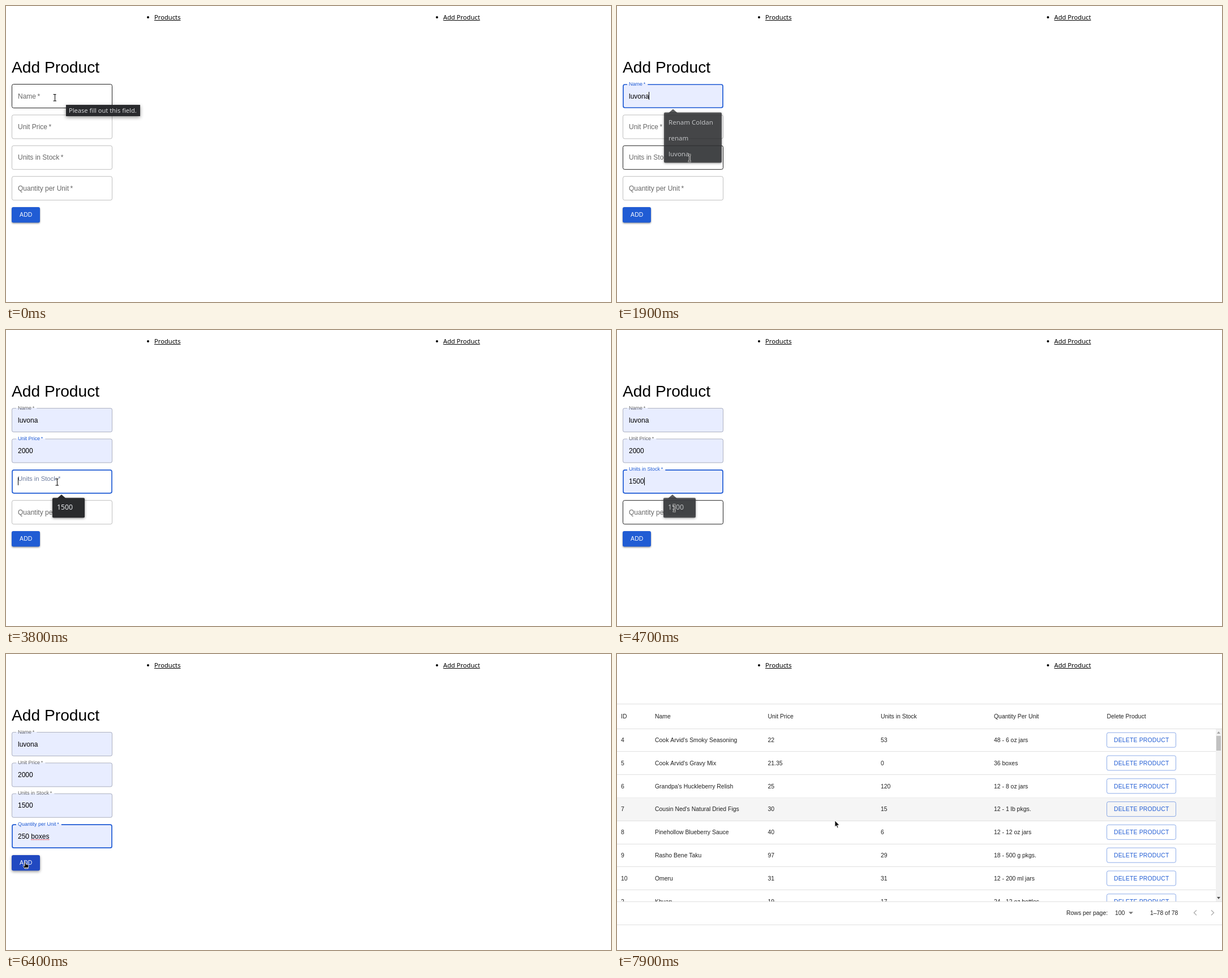
Recreate the animation shown at these times as an HTML page with a canvas. Size 1069x524 px, loop 8000 ms.

```html
<!DOCTYPE html>
<html lang="en">
<head>
<meta charset="utf-8">
<title>Add Product</title>
<style>
html, body { margin: 0; width: 100%; height: 100%; overflow: hidden; background: #fff; }
canvas { display: block; }
</style>
</head>
<body>
<canvas id="stage" width="1069" height="524"></canvas>
<script>
const ctx = document.getElementById('stage').getContext('2d');
const W = 1069, H = 524, LOOP = 8000, STEP = 100;
const SANS = '"Liberation Sans", Arial, sans-serif';
const NOTO = '"Noto Sans", "Open Sans", sans-serif';
const BLUE = '#205cd4', INK = 'rgba(0,0,0,.87)', GREY = 'rgba(0,0,0,.6)', LINE = '#e0e0e0';

// floatAt: label rises; focus..blur: focused; fillAt: suggestion previewed; pick: suggestion accepted
const fields = [
  { label: 'Name', value: 'luvona', items: ['Renam Coldan', 'renam', 'luvona'], popW: 102,
    floatAt: 250, focus: 300, blur: 2700, open: 400, fillAt: 1400, pick: 1900 },
  { label: 'Unit Price', value: '2000', items: ['2000'], popW: 57,
    floatAt: 2500, focus: 2700, blur: 3800, open: 2700, fillAt: 3100, pick: 3400 },
  { label: 'Units in Stock', value: '1500', items: ['1500'], popW: 57,
    floatAt: 3750, focus: 3800, blur: 5200, open: 3800, fillAt: 4200, pick: 4700 },
  { label: 'Quantity per Unit', value: '250 boxes', items: ['250 boxes'], popW: 85,
    floatAt: 5150, focus: 5200, blur: 6600, open: 5300, fillAt: 5800, pick: 5900 }
];
fields.forEach((f, i) => { f.y = 138.5 + 54.4 * i; });

const rows = [
  [4, "Cook Arvid's Smoky Seasoning", '22', '53', '48 - 6 oz jars'],
  [5, "Cook Arvid's Gravy Mix", '21.35', '0', '36 boxes'],
  [6, "Grandpa's Huckleberry Relish", '25', '120', '12 - 8 oz jars'],
  [7, "Cousin Ned's Natural Dried Figs", '30', '15', '12 - 1 lb pkgs.'],
  [8, 'Pinehollow Blueberry Sauce', '40', '6', '12 - 12 oz jars'],
  [9, 'Rasho Bene Taku', '97', '29', '18 - 500 g pkgs.'],
  [10, 'Omeru', '31', '31', '12 - 200 ml jars'],
  [2, 'Khuan', '19', '17', '24 - 12 oz bottles']
];
const heads = ['ID', 'Name', 'Unit Price', 'Units in Stock', 'Quantity Per Unit', 'Delete Product'];
const cols = [7, 67, 266.5, 466, 666, 865.5];

// time, x, y
const path = [
  [0, 86, 162], [100, 78, 162], [1100, 78, 162], [1200, 86, 190], [1300, 106, 245], [1400, 118, 272],
  [1600, 128, 268], [1900, 128, 269], [2000, 148, 262], [2400, 196, 226], [2600, 196, 226],
  [2700, 60, 223], [2900, 60, 223], [3100, 100, 256], [3400, 104, 260], [3800, 90, 269],
  [3900, 90, 270], [4200, 100, 312], [4700, 101, 315], [5200, 97, 335], [5600, 97, 335],
  [5800, 104, 366], [5900, 104, 368], [6400, 35, 368], [6500, 35, 369], [6600, 295, 383],
  [6700, 295, 383], [6800, 350, 296], [7400, 350, 296], [7600, 365, 299], [7700, 365, 299], [7900, 385, 295]
];

const clamp = v => Math.max(0, Math.min(1, v));
const mix = (a, b, p) => a + (b - a) * p;

function pointer(t) {
  let i = path.length - 1;
  while (path[i][0] > t) i--;
  const a = path[i], b = path[i + 1] || a;
  const p = b === a ? 0 : (t - a[0]) / (b[0] - a[0]);
  return { x: mix(a[1], b[1], p), y: mix(a[2], b[2], p) };
}

function text(s, x, y, size, color = INK, family = SANS, spacing = 0) {
  ctx.font = `${size}px ${family}`;
  ctx.letterSpacing = spacing + 'px';
  ctx.fillStyle = color;
  ctx.fillText(s, x, y);
  return ctx.measureText(s).width;
}

function rect(x, y, w, h, color) {
  ctx.fillStyle = color;
  ctx.fillRect(x, y, w, h);
}

function round(x, y, w, h, r) {
  ctx.beginPath();
  ctx.roundRect(x, y, w, h, r);
}

function poly(points, fill, stroke, width = 1) {
  ctx.beginPath();
  points.forEach(([x, y]) => ctx.lineTo(x, y));
  if (fill) { ctx.closePath(); ctx.fillStyle = fill; ctx.fill(); }
  if (stroke) { ctx.strokeStyle = stroke; ctx.lineWidth = width; ctx.stroke(); }
}

function shadow(alpha, blur, dy) {
  ctx.shadowColor = `rgba(0,0,0,${alpha})`;
  ctx.shadowBlur = blur;
  ctx.shadowOffsetY = dy;
}

function link(s, x) {
  ctx.beginPath();
  ctx.arc(x - 11, 20, 2, 0, 7);
  ctx.fillStyle = '#000';
  ctx.fill();
  const w = text(s, x, 24, 11.2, '#000', NOTO);
  rect(x, 25, w, 1, '#000');
}

function drawField(f, t, hover) {
  const up = clamp((t - f.floatAt) / 200);
  const focused = t >= f.focus && t < f.blur;
  const filled = t >= f.fillAt;
  const size = mix(12, 9, up);
  const label = f.label + '\u2009*';

  if (filled) {
    round(10, f.y - .5, 178, 43, 3);
    ctx.fillStyle = '#e8edff';
    ctx.fill();
  }

  ctx.save();
  if (up > .5) {
    ctx.font = `9px ${SANS}`;
    ctx.letterSpacing = '0px';
    const gap = ctx.measureText(label).width + 7;
    ctx.beginPath();
    ctx.rect(0, f.y - 5, 200, 55);
    ctx.rect(18, f.y - 3, gap, 6);
    ctx.clip('evenodd');
  }
  const inset = focused ? .5 : 0;
  round(10.5 + inset, f.y + inset, 177 - 2 * inset, 42 - 2 * inset, 3);
  ctx.lineWidth = focused ? 1.7 : 1;
  ctx.strokeStyle = focused ? BLUE : hover ? INK : 'rgba(0,0,0,.25)';
  ctx.stroke();
  ctx.restore();

  const fading = t === f.blur && f.blur < 6600;
  const color = up > 0 && up < 1 ? '#6b7a9c' : focused || fading ? BLUE : GREY;
  text(label, 21, f.y + mix(25, 2, up), size, color);

  let end = 21;
  if (filled) end += text(f.value, 21, f.y + 25, 12, '#000');
  const blink = (t - (t >= f.pick ? f.pick : f.open)) % 1000;
  if (focused && t >= f.open && blink < 500) rect(Math.round(end), f.y + 13.5, 1, 14, '#000');

  if (f.value.includes(' ') && t >= f.pick) {
    ctx.font = `12px ${SANS}`;
    const start = 21 + ctx.measureText('250 ').width;
    ctx.setLineDash([2, 1]);
    poly([[start, f.y + 27], [end, f.y + 27]], null, '#e02020');
    ctx.setLineDash([]);
  }
}

function drawPopup(f, t) {
  const alpha = t < f.pick ? 1 : t === f.pick ? .76 : t === f.pick + 100 ? .3 : 0;
  if (t < f.open || !alpha) return;
  const many = f.items.length > 1;
  const x = many ? 83 : 82, y = f.y + 50, h = many ? 89 : 35;
  ctx.save();
  ctx.globalAlpha = alpha;
  poly([[x + 8, y + 1], [x + 16, y - 6], [x + 24, y + 1]], '#2a2b2d');
  shadow(.5, 4, 1);
  round(x, y, f.popW, h, 2);
  ctx.fillStyle = '#2a2b2d';
  ctx.fill();
  shadow(0, 0, 0);
  if (t >= f.fillAt) rect(x, y + h - (many ? 30 : 32), f.popW, 28, '#424346');
  f.items.forEach((s, i) => text(s, x + 8, y + 21 + 28 * i, many ? 11.5 : 12.3, '#e8eaed', NOTO));
  ctx.restore();
}

function drawTooltip() {
  ctx.save();
  shadow(.45, 6, 2);
  rect(106, 175, 131, 20, '#292a2d');
  ctx.restore();
  text('Please fill out this field.', 111, 189, 11.1, '#d4d5d7', NOTO);
}

function drawForm(t, p) {
  text('Add Product', 10, 118, 28.2, '#000');
  const overPopup = fields.some(f => t >= f.open + 100 && t < f.pick && p.y > f.y + 44);
  fields.forEach(f => {
    const inside = p.x > 10 && p.x < 188 && p.y > f.y && p.y < f.y + 42;
    drawField(f, t, inside && !overPopup);
  });

  const hot = t >= 6300 && t < 6600;
  ctx.save();
  shadow(.4, hot ? 5 : 3, hot ? 2 : 1.5);
  round(10, 356, 50, 27.5, 3);
  ctx.fillStyle = hot ? '#2149c1' : BLUE;
  ctx.fill();
  ctx.restore();
  text('ADD', 24, 373, 10.4, '#fff', SANS, .2);

  fields.forEach(f => drawPopup(f, t));
  if (t < 300) drawTooltip();
  return hot ? 'hand' : !overPopup && p.x < 188 && p.y < 345 ? 'beam' : 'arrow';
}

function drawRow(row, i, p) {
  const y = 132 + 40.8 * i;
  if (p.y >= y && p.y < y + 40.8) rect(0, y, 1058, 40.8, '#f5f5f5');
  row.forEach((s, c) => text(s, cols[c], y + 24, 10.45));
  round(865.5, y + 7.2, 122, 26, 3);
  ctx.lineWidth = 1;
  ctx.strokeStyle = 'rgba(32,92,212,.5)';
  ctx.stroke();
  text('DELETE PRODUCT', 878, y + 24, 10.4, BLUE, SANS, .2);
  rect(0, Math.floor(y + 40.8), 1058, 1, LINE);
}

function drawTable(t, p) {
  const loaded = t >= 7300;
  [88, 132, 438, 479].forEach(y => rect(0, y, W, 1, LINE));
  heads.forEach((s, i) => text(s, cols[i], 113.5, 10.45));
  if (loaded) {
    ctx.save();
    ctx.beginPath();
    ctx.rect(0, 133, W, 305);
    ctx.clip();
    rows.forEach((row, i) => drawRow(row, i, p));
    rect(1058, 133, 11, 305, '#f1f1f1');
    rect(1059, 145, 8, 26, '#c1c1c1');
    poly([[1060, 141], [1063, 137], [1066, 141]], '#a3a3a3');
    poly([[1060, 430], [1063, 434], [1066, 430]], '#505050');
    ctx.restore();
  }
  text('Rows per page:', 794, 462, 10.45);
  text('100', 880, 462, 10.45);
  poly([[904, 456.5], [912, 456.5], [908, 460.5]], 'rgba(0,0,0,.54)');
  text(loaded ? '1–78 of 78' : '0–0 of 0', 942, 462, 10.45);
  poly([[1024, 453.5], [1019.5, 458], [1024, 462.5]], null, 'rgba(0,0,0,.3)', 1.5);
  poly([[1050, 453.5], [1054.5, 458], [1050, 462.5]], null, 'rgba(0,0,0,.3)', 1.5);
}

function drawPointer(kind, { x, y }) {
  ctx.save();
  ctx.translate(Math.round(x), Math.round(y));
  ctx.lineJoin = 'round';
  if (kind === 'beam') {
    for (const [color, width] of [['#fff', 2.6], ['#111', 1.1]]) {
      poly([[-2.5, -5.5], [2.5, -5.5]], null, color, width);
      poly([[.5, -5.5], [.5, 6]], null, color, width);
      poly([[-2.5, 6], [3, 6]], null, color, width);
    }
  } else if (kind === 'hand') {
    poly([[-2, 0], [0, 0], [0, 4], [4, 5], [5, 7], [4, 12], [-2, 12], [-5, 7], [-4, 6], [-2, 8]], '#000', '#fff', .8);
    rect(-2, 10, 6, 1, '#fff');
  } else {
    poly([[0, 0], [0, 11], [2.5, 8.8], [4.3, 13], [6, 12.2], [4.3, 8.2], [7.8, 7.8], [0, 0]], '#111', '#fff', .7);
  }
  ctx.restore();
}

function draw(now) {
  const t = Math.floor(now % LOOP / STEP) * STEP;
  const p = pointer(t);
  rect(0, 0, W, H, '#fff');
  link('Products', 262);
  link('Add Product', 772.5);
  let kind = 'arrow';
  if (t < 7100) kind = drawForm(t, p);
  else drawTable(t, p);
  drawPointer(kind, p);
}

const began = performance.now();
function tick() {
  draw(performance.now() - began);
  requestAnimationFrame(tick);
}
tick();
</script>
</body>
</html>
```
